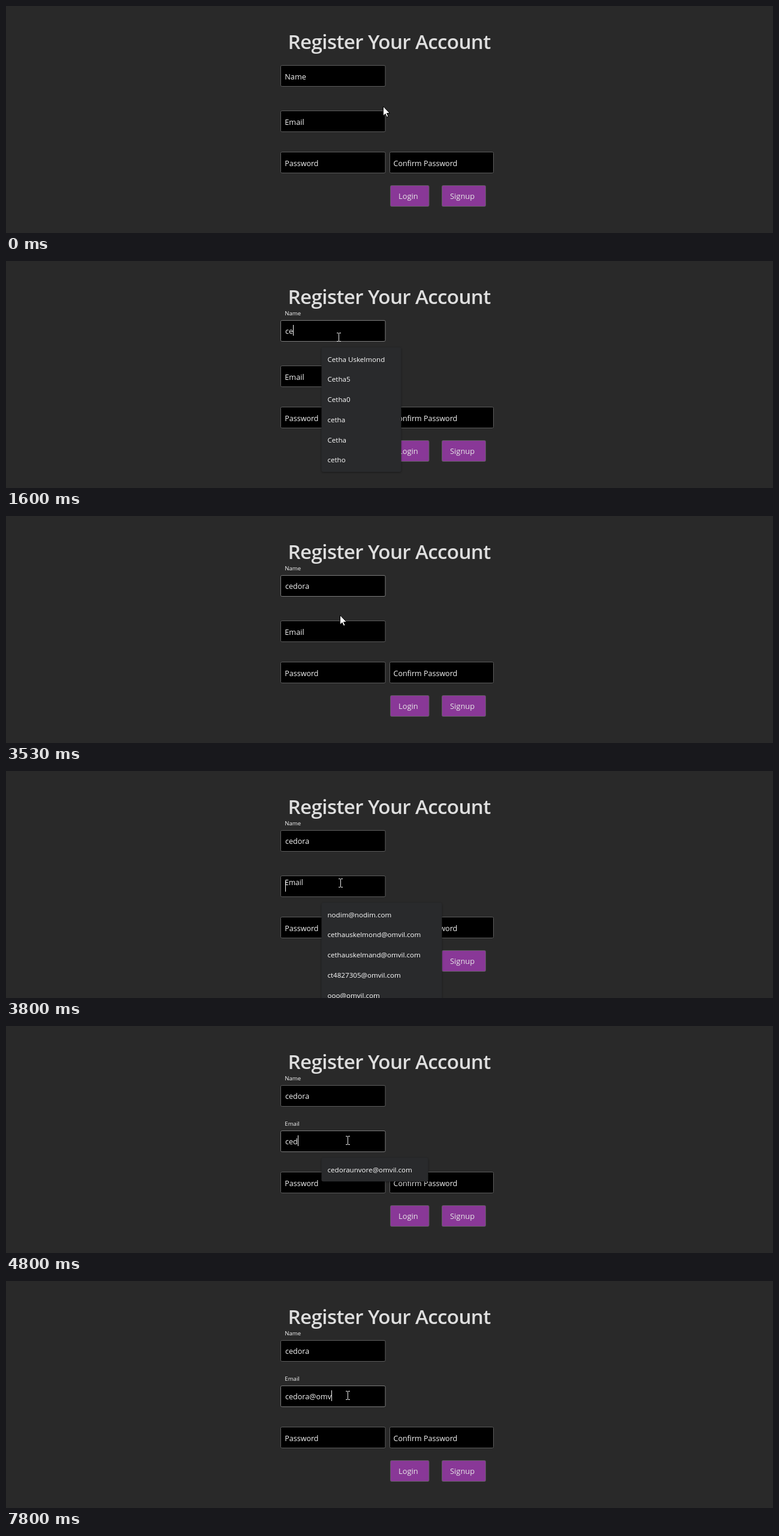
Animation, 1280 px wide and 380 px high, one loop 8000 ms. Source, as an HTML page with a canvas:

```html
<!DOCTYPE html>
<html lang="en">
<head>
<meta charset="utf-8">
<title>Register</title>
<style>
  html, body { margin: 0; width: 100%; height: 100%; overflow: hidden; background: #292929; }
  canvas { display: block; }
</style>
</head>
<body>
<canvas id="stage" width="1280" height="380"></canvas>
<script>
const ctx = document.getElementById('stage').getContext('2d');
const LOOP = 8000, FPS = 15;
const TEXT = '#f6f6f6', BORDER = '#5c5c5c', PURPLE = '#893897';

const nameTyping = { text: 'cedora', times: [1470, 1600, 1930, 2330, 2470, 2600] };
const emailTyping = {
  text: 'cedora@omv',
  times: [4130, 4270, 4800, 5130, 5200, 5330, 6600, 7330, 7670, 7800]
};
const inputs = [
  { label: 'Name', y: 99, focus: 395, blur: 3700, typing: nameTyping },
  { label: 'Email', y: 175, focus: 3718, blur: LOOP, typing: emailTyping }
];
const caretHidden = [[1000, 1470], [3130, 3700], [5930, 6470], [7130, 7330]];

const mail = user => user + '@omvil.com';
const longMails = ['cethauskelmond', 'cethauskelmand'].map(mail);
// Each entry stays until the next one starts.
const popups = [
  { at: 0 },
  { at: 470, y: 144, w: 134, rows: ['Cetha Uskelmond', 'Cetha5', 'ce', 'Cetha0', 'cetha', 'Cetha'] },
  { at: 1600, y: 144, w: 134, rows: ['Cetha Uskelmond', 'Cetha5', 'Cetha0', 'cetha', 'Cetha', 'cetho'] },
  { at: 1930 },
  { at: 3730, y: 220, w: 202, rows: ['nodim@nodim.com', ...longMails, mail('ct4827305'), mail('ooo')] },
  { at: 4130, y: 220, w: 194, rows: [...longMails, ...['ct4827305', 'cetho', 'cetha'].map(mail)] },
  { at: 4270, y: 220, w: 194, rows: [...longMails, ...['cetho', 'cetha', 'cethi5'].map(mail)] },
  { at: 4800, y: 220, w: 179, rows: [mail('cedoraunvore')] },
  { at: 6600 }
];

// Pointer path: time, x, y
const path = [
  [0, 629, 168], [30, 629, 168], [270, 560, 130], [400, 553, 127],
  [860, 553, 127], [870, 555, 127], [3060, 555, 127], [3070, 555, 128],
  [3290, 555, 128], [3660, 558, 185], [3800, 558, 187], [4130, 570, 191]
];

const clamp = v => Math.max(0, Math.min(1, v));
const smooth = v => v * v * (3 - 2 * v);
const mix = (a, b, p) => a + (b - a) * p;

function text(str, x, y, size, color = TEXT, weight = 400, spacing = 0) {
  ctx.font = `${weight} ${size}px "Open Sans", "Noto Sans", sans-serif`;
  ctx.letterSpacing = spacing + 'px';
  ctx.fillStyle = color;
  ctx.fillText(str, x, y);
  return ctx.measureText(str).width;
}

function box(x, y, w, h, fill, stroke, radius = 2) {
  ctx.beginPath();
  ctx.roundRect(x + .5, y + .5, w - 1, h - 1, radius);
  ctx.fillStyle = fill;
  ctx.fill();
  if (!stroke) return;
  ctx.lineWidth = 1;
  ctx.strokeStyle = stroke;
  ctx.stroke();
}

function drawInput({ label, y, focus, blur, typing }, t) {
  const focused = t >= focus && t < blur;
  const lift = smooth(clamp((t - focus) / 265));
  box(458, y, 175.5, 36, '#000', focused && lift > .6 ? '#7c7c7c' : BORDER);
  text(label, 465.3, mix(y + 24, y - 8, lift), mix(12.7, 9.6, lift));

  const typed = typing.text.slice(0, typing.times.filter(at => t >= at).length);
  const width = text(typed, 466, y + 23, 12.55);
  const hidden = caretHidden.some(([from, to]) => t >= from && t < to);
  if (focused && !hidden) {
    ctx.fillStyle = TEXT;
    ctx.fillRect(Math.round(466 + width), typed ? y + 8 : y + 9, 1, 18);
  }
}

function drawPopup({ rows, y, w }) {
  if (!rows) return;
  ctx.save();
  ctx.shadowColor = 'rgba(0,0,0,.4)';
  ctx.shadowBlur = 3;
  ctx.shadowOffsetY = 1;
  box(526, y, w, rows.length * 33.75 + 7, '#292a2c', null, 3);
  ctx.restore();
  rows.forEach((row, i) => text(row, 536.5, y + 24.5 + i * 33.75, 11.6, '#fff'));
}

function pointerAt(t) {
  const next = path.findIndex(p => p[0] > t);
  if (next < 0) return path[path.length - 1].slice(1);
  const a = path[next - 1], b = path[next];
  const p = (t - a[0]) / (b[0] - a[0]);
  return [1, 2].map(i => Math.round(mix(a[i], b[i], p)));
}

function drawPointer(x, y) {
  const overInput = x > 458 && x < 634 && inputs.some(f => y > f.y && y < f.y + 36);
  ctx.save();
  ctx.translate(x, y);
  if (overInput) {
    ctx.fillStyle = '#eee';
    ctx.fillRect(-3, -7, 3, 1);
    ctx.fillRect(1, -7, 3, 1);
    ctx.fillRect(0, -6, 1, 13);
    ctx.fillRect(-3, 7, 3, 1);
    ctx.fillRect(1, 7, 3, 1);
  } else {
    ctx.fillStyle = '#fff';
    ctx.strokeStyle = '#000';
    ctx.lineWidth = 1;
    const arrow = new Path2D('M.5 0V16L4 12.5 6.5 18 9 17 6.5 11.5H11.5Z');
    ctx.fill(arrow);
    ctx.stroke(arrow);
  }
  ctx.restore();
}

function draw(t) {
  ctx.fillStyle = '#292929';
  ctx.fillRect(0, 0, 1280, 380);
  text('Register Your Account', 470.5, 72, 33.2, '#dedede', 600, -.65);

  inputs.forEach(input => drawInput(input, t));
  box(458, 244, 175.5, 36, '#000', BORDER);
  text('Password', 465.3, 268, 12.5);
  box(640, 244, 174, 36, '#000', BORDER);
  text('Confirm Password', 646.5, 268, 12.5);

  box(641, 300, 65.5, 36, PURPLE, BORDER);
  text('Login', 655, 323, 12.9, '#e6e6e6');
  box(727, 300, 74, 36, PURPLE, BORDER);
  text('Signup', 741, 323, 12.9, '#e6e6e6');

  drawPopup(popups.filter(p => t >= p.at).pop());
  drawPointer(...pointerAt(t));
}

function tick() {
  // Step at a fixed rate; 4 ms covers the rounding of event times.
  const t = (performance.now() + 4) % LOOP;
  draw(Math.floor(t * FPS / 1000) * 1000 / FPS + 4);
  requestAnimationFrame(tick);
}
tick();
</script>
</body>
</html>
```
